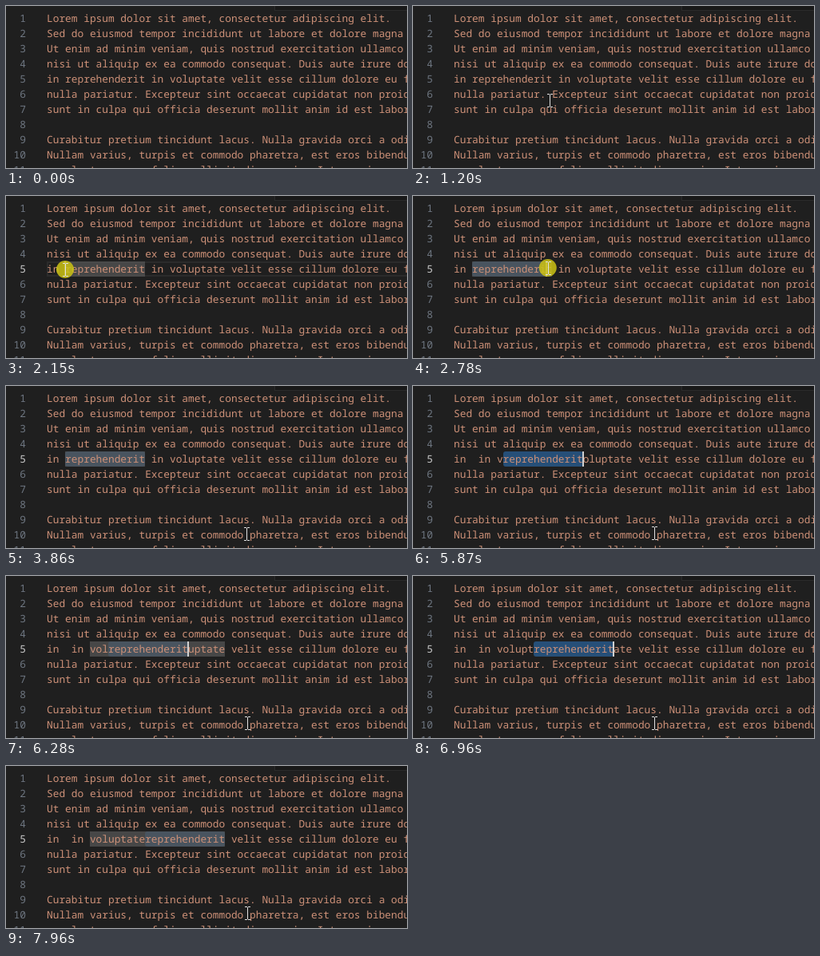
These frames come from a looping animation (502x203 px, 8000 ms). An HTML page with a canvas:

```html
<!DOCTYPE html>
<html lang="la">
<head>
<meta charset="utf-8">
<style>
  html, body { margin: 0; width: 100%; height: 100%; overflow: hidden; background: #1f1f1f; }
  canvas { display: block; }
</style>
</head>
<body>
<canvas id="stage" width="502" height="203"></canvas>
<script>
const ctx = document.getElementById('stage').getContext('2d');
const LOOP = 8000, LEFT = 51, TOP = 6, ROW = 19, CHAR = 7.7, ACTIVE = 4;
const WORD = 'reprehenderit', BEFORE = 'in ', AFTER = ' in voluptate velit esse cillum dolore eu fugiat';
const lines = [
  'Lorem ipsum dolor sit amet, consectetur adipiscing elit.',
  'Sed do eiusmod tempor incididunt ut labore et dolore magna aliqua.',
  'Ut enim ad minim veniam, quis nostrud exercitation ullamco laboris',
  'nisi ut aliquip ex ea commodo consequat. Duis aute irure dolor',
  '',
  'nulla pariatur. Excepteur sint occaecat cupidatat non proident,',
  'sunt in culpa qui officia deserunt mollit anim id est laborum.',
  '',
  'Curabitur pretium tincidunt lacus. Nulla gravida orci a odio.',
  'Nullam varius, turpis et commodo pharetra, est eros bibendum elit,',
  'nec luctus magna felis sollicitudin mauris. Integer in mauris'
];

// Times at which the selected word hops one column to the right
const hops = [4940, 5270, 5540, 5740, 5870, 6080, 6210, 6350, 6690, 6960, 7160, 7360, 7490];
const PRESS = 2080, RELEASE = 3250, HIGHLIGHT_DELAY = 62, BLINK = 470;

// Pointer stops: time, x, y
const path = [
  [630, 420, 210], [1440, 105, 93], [1900, 76, 92], [2050, 76, 92], [2080, 74, 92], [2170, 74, 92],
  [2800, 169, 90], [2920, 172, 88], [3050, 170, 87], [3230, 170, 87],
  [3670, 301, 185], [3840, 301, 185], [4000, 302, 184]
];

const colX = col => Math.round(LEFT + col * CHAR);
const smooth = p => p * p * (3 - 2 * p);

function pointerAt(t) {
  if (t < path[0][0]) return null;
  const next = path.findIndex(stop => stop[0] > t);
  if (next < 0) return path.at(-1).slice(1);
  const [t0, x0, y0] = path[next - 1], [t1, x1, y1] = path[next];
  const p = smooth((t - t0) / (t1 - t0));
  return [x0 + (x1 - x0) * p, y0 + (y1 - y0) * p];
}

function editorAt(t, pointer) {
  const moved = hops.filter(time => time <= t).length;
  const start = BEFORE.length + moved;
  const text = BEFORE + AFTER.slice(0, moved) + WORD + AFTER.slice(moved);
  if (t < PRESS) return { text };
  const dragged = Math.round((pointer[0] - LEFT) / CHAR);
  const end = t < 2880 ? Math.max(start, Math.min(start + WORD.length, dragged)) : start + WORD.length;
  const since = moved ? t - hops[moved - 1] : 0;
  const caret = moved ? since < BLINK : !(t >= 3460 && t < 3960 || t >= 4470);
  const highlight = (moved ? since >= HIGHLIGHT_DELAY : t >= 2140) && [
    text.slice(0, start).search(/\w*$/),
    start + text.slice(start).match(/^\w+/)[0].length
  ];
  return { text, start, end, caret, highlight, active: true };
}

function drawMarks({ start, end, highlight }) {
  const y = TOP + ACTIVE * ROW;
  if (start === end) {
    ctx.strokeStyle = '#2b2b2b';
    ctx.lineWidth = 2;
    ctx.strokeRect(LEFT + 1, y + 1, 502, ROW - 2);
  } else {
    ctx.fillStyle = '#264f78';
    ctx.beginPath();
    ctx.roundRect(colX(start), y, colX(end) - colX(start), ROW, 3);
    ctx.fill();
  }
  if (highlight) {
    const [from, to] = highlight;
    ctx.fillStyle = 'rgba(87, 87, 87, .72)';
    ctx.fillRect(colX(from), y, colX(to) - colX(from), ROW);
  }
}

function drawText(editor) {
  ctx.font = '12.83px "Noto Sans Mono", monospace';
  ctx.textRendering = 'geometricPrecision';
  lines.forEach((line, i) => {
    const baseline = TOP + i * ROW + 14;
    const current = i === ACTIVE;
    ctx.textAlign = 'right';
    ctx.fillStyle = current && editor.active ? '#cccccc' : '#6e7681';
    ctx.fillText(i + 1, 25, baseline);
    ctx.textAlign = 'left';
    ctx.fillStyle = '#ce9178';
    ctx.fillText(current ? editor.text : line, LEFT, baseline);
  });
}

function drawPointer([x, y], pressed) {
  if (pressed) {
    ctx.fillStyle = 'rgba(205, 195, 20, .85)';
    ctx.beginPath();
    ctx.arc(x, y, 11, 0, 2 * Math.PI);
    ctx.fill();
  }
  const px = Math.round(x), py = Math.round(y);
  ctx.fillStyle = '#e0e0e0';
  ctx.fillRect(px, py - 7, 1, 15);
  for (const edge of [py - 8, py + 8]) {
    ctx.fillRect(px - 3, edge, 3, 1);
    ctx.fillRect(px + 1, edge, 3, 1);
  }
}

function draw(now) {
  const t = now % LOOP;
  const pointer = pointerAt(t);
  const editor = editorAt(t, pointer);
  ctx.fillStyle = '#1f1f1f';
  ctx.fillRect(0, 0, 502, 203);
  ctx.fillStyle = '#2b2b2b';
  ctx.fillRect(336, 0, 166, 6);
  ctx.fillStyle = '#181818';
  ctx.fillRect(337, 0, 165, 5);
  if (editor.active) drawMarks(editor);
  drawText(editor);
  if (editor.caret) {
    ctx.fillStyle = '#d0d0d0';
    ctx.fillRect(colX(editor.end) - 1, TOP + ACTIVE * ROW, 2, ROW);
  }
  if (pointer) drawPointer(pointer, t >= PRESS && t < RELEASE);
  requestAnimationFrame(draw);
}
requestAnimationFrame(draw);
</script>
</body>
</html>
```
